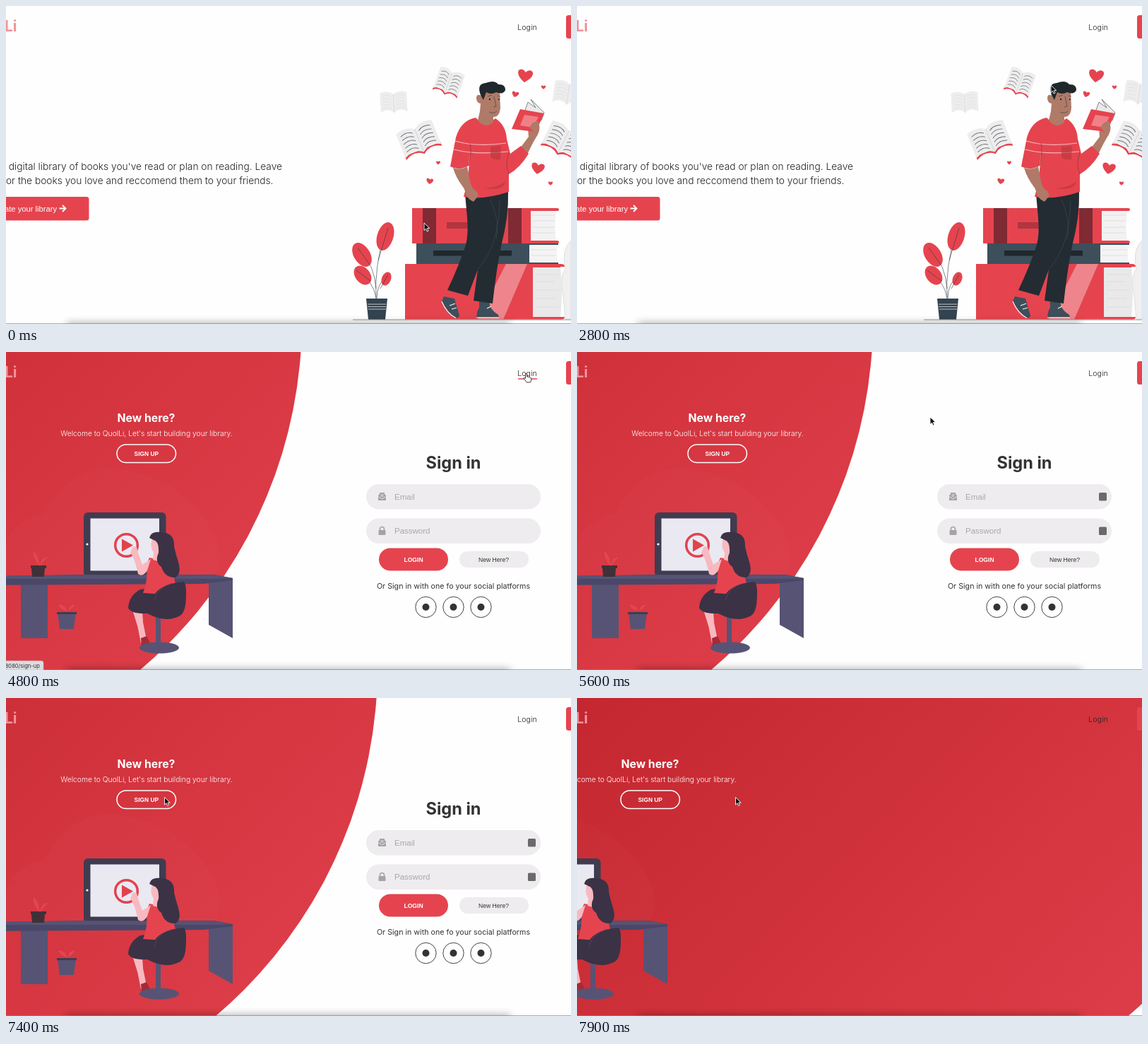
Write an HTML page that moves like this. It is 800 px wide and 450 px high and loops after 8 s.

```html
<!DOCTYPE html>
<html lang="en">
<head>
<meta charset="utf-8">
<title>Book library</title>
<style>
html, body { margin: 0; height: 100%; overflow: hidden; background: #fefefe; }
svg { display: block; width: 100vw; height: 100vh; }
text { font-family: Inter, "Open Sans", sans-serif; fill: #333; }
.light { font-weight: 300; fill: #222; }
.bold { font-weight: 700; }
.arial { font-family: "Liberation Sans", Arial, sans-serif; }
.mid { text-anchor: middle; }
.end { text-anchor: end; }
.white { fill: #fff; }
.red { fill: #e5444f; }
.hair { fill: #20282d; }
.slate { fill: #3d4f5b; }
.skin { fill: #b07a68; }
.field { fill: #eeecee; }
.icon { fill: #a5a3a6; }
.hint { fill: #a9a7aa; font-size: 11.5px; }
.ink { fill: #3b3246; }
.desk { fill: #575375; }
.pink { fill: #f8b9c0; }
.line { fill: none; stroke: #2f393f; stroke-width: .6; }
</style>
</head>
<body>
<svg viewBox="0 0 800 450">
  <defs>
    <linearGradient id="redFade" x1="0" y1="0" x2="1" y2="1">
      <stop stop-color="#b0161c"/><stop offset="1" stop-color="#e4434f"/>
    </linearGradient>
    <filter id="blur" x="-10%" y="-200%" width="120%" height="500%"><feGaussianBlur stdDeviation="6"/></filter>
    <path id="heart" d="M0 9C-6 5-11 0-10.500-5C-10-9.500-3-10 0-5C3-10 10-9.500 10.500-5C11 0 6 5 0 9Z"/>
    <g id="pages">
      <path d="M0-11Q-10-17-23-13V12Q-10 6 0 13Q10 6 23 12V-13Q10-17 0-11Z" fill="#ededee"/>
      <path d="M0-11V13" stroke="#d0d0d3" stroke-width=".6"/>
    </g>
    <g id="textLines" fill="none" stroke-width=".7">
      <path d="M-19-9Q-10-12-4-8M-19-5Q-10-8-4-4M-19-1Q-10-4-4 0M-19 3Q-10 0-4 4M-19 7Q-10 4-4 8"/>
      <path d="M19-9Q10-12 4-8M19-5Q10-8 4-4M19-1Q10-4 4 0M19 3Q10 0 4 4M19 7Q10 4 4 8"/>
    </g>
    <g id="openBook">
      <path class="red" d="M-23 10V14Q-10 8 0 15Q10 8 23 14V10Z"/>
      <use href="#pages"/><use href="#textLines" stroke="#6f7075"/>
    </g>
    <g id="paleBook"><use href="#pages"/><use href="#textLines" stroke="#dfdfe1"/></g>
  </defs>

  <g id="landing">
    <text class="light end" x="391" y="232" font-size="13.75">Create a digital library of books you've read or plan on reading. Leave</text>
    <text class="light end" x="378.500" y="252" font-size="13.75">reviews for the books you love and reccomend them to your friends.</text>
    <rect class="red" x="-60" y="270" width="177.500" height="33.500" rx="3.500"/>
    <text class="arial end white" x="72" y="290.500" font-size="11.2">Create your library</text>
    <path d="M75.500 286.500H84M80 282l4.500 4.500-4.500 4.500" fill="none" stroke="#fff" stroke-width="1.800"/>

    <use href="#openBook" transform="translate(627 108) rotate(20) scale(.8 1.250)"/>
    <use href="#openBook" transform="translate(584.500 189) rotate(-22) scale(1.180 1.450)"/>
    <use href="#paleBook" transform="translate(549 137) rotate(-3) scale(.82 1.100)"/>
    <use href="#paleBook" transform="translate(796 124) rotate(8) scale(.9 1.200)"/>
    <use href="#openBook" transform="translate(790 191) rotate(26) scale(1.180 1.450)"/>
    <g class="red">
      <use href="#heart" transform="translate(735 99) rotate(8)"/>
      <use href="#heart" transform="translate(721 125) rotate(15) scale(.46)"/>
      <use href="#heart" transform="translate(761 115) scale(.3)"/>
      <use href="#heart" transform="translate(753 230) rotate(10) scale(.88)"/>
      <use href="#heart" transform="translate(600 248) rotate(8) scale(.46)"/>
      <use href="#heart" transform="translate(612 222) scale(.28)"/>
      <use href="#heart" transform="translate(771 251) scale(.3)"/>
    </g>

    <!-- book stack -->
    <path d="M800 332Q786 345 792 372Q783 385 789 410L792 443H800Z" fill="#f0f0f1" stroke="#dedee0"/>
    <path d="M491 444H800" stroke="#777" stroke-width=".8"/>
    <path class="red" d="M565 365H786Q791 365 791 369H785V440H791Q791 443.500 786 443.500H565Z"/>
    <path d="M746 370H785Q789 405 785 440H746Z" fill="#e9e9ea"/>
    <path d="M750 380H782M750 390H776M750 402H783M750 414H778M750 426H783" stroke="#d3d3d6" stroke-width=".6"/>
    <path d="M708 365H738L704 443.500H668Z" fill="#ee858c"/>
    <path class="slate" d="M581 336H782V338H741V363H782V365H581Z"/>
    <path d="M741 338H780V363H741Z" fill="#f4f4f4"/>
    <path class="hair" d="M605 346H716V353.500H605Z"/>
    <path class="red" d="M575 286H780Q783 286 783 288T780 290H743V332H780Q783 332 783 334T780 336H575Z"/>
    <path d="M743 290H779Q776 311 779 332H743Z" fill="#f2f2f3"/>
    <path d="M745 296H777M745 304H777M745 313H777M745 321H777M743 345H779M743 353H779" stroke="#d8cdd0" stroke-width=".6"/>
    <path d="M590 286h19v50h-19zM711 286h19v50h-19z" fill="#802a33"/>
    <path d="M624 306h46v9h-46z" fill="#b2353f"/>

    <!-- potted plant -->
    <path class="line" d="M524 415Q521 370 537 318M524 400Q522 367 500 344M524 413Q520 390 500 376M525 414Q525 393 540 381"/>
    <g class="red">
      <ellipse rx="11.500" ry="20.500" transform="translate(537 326) rotate(17)"/>
      <ellipse rx="11.500" ry="18.500" transform="translate(504 352) rotate(-32)"/>
      <ellipse rx="10.500" ry="15" transform="translate(505 381) rotate(-38)"/>
      <ellipse rx="6.500" ry="10" transform="translate(538.500 386) rotate(22)"/>
    </g>
    <path class="line" d="M527 360L541 314M515 366L498 342M516 389L496 374M530 400L541 380"/>
    <path d="M510 414H540L537 443.500H513Z" fill="#33434f"/>
    <path d="M512 422H538M512 425.500H538M513 429H538" stroke="#dfe2e4" stroke-width=".8"/>

    <!-- reader -->
    <path class="slate" d="M620 411L635 414L642 438Q641 443 635 440Q625 433 617 418Z"/>
    <path class="slate" d="M670 418H684Q685 430 697 437L698 440H666Q667 430 670 427Z"/>
    <path d="M617 418Q624 435 637 441.500M666 441H698M628 424L636 421M631 429L638 427M681 428L687 425" fill="none" stroke="#f4f5f5" stroke-width="1.200"/>
    <path d="M650 266L711 263Q712 298 701 340Q694 375 689 421L662 417L668 373L654 410L625 402Q642 366 651 338Q655 322 653 300Z" fill="#232c32"/>
    <path d="M699 275Q698 340 668 373M686 274Q700 305 694 330" fill="none" stroke="#3d484f" stroke-width=".7"/>
    <path class="skin" d="M728 201L740 185Q738 171 743 167L753 163Q758 171 753 182Q747 191 738 210Z"/>
    <path class="red" d="M665 158Q644 162 637 186L629 227Q641 234 655 226L657 208Q655 245 648 270Q675 275 712 263L712 238Q728 229 740 209L729 198L714 209L709 188Q708 169 693 159Q678 172 665 158Z"/>
    <path d="M636 191Q665 200 708 194M634 203Q665 211 711 206" fill="none" stroke="#f5b5b9" stroke-width="1.200"/>
    <path d="M686 199L701 198L700 217Q692 219 686 214ZM678 258Q699 256 707 248Q705 262 678 258Z" fill="#bd3640" opacity=".65"/>
    <path d="M655 226Q660 205 657 194M712 238Q706 225 712 207" fill="none" stroke="#98303a" stroke-width=".7"/>
    <path class="skin" d="M633 229Q644 233 653 227L657 248Q659 258 666 262L669 268L662 277Q655 274 651 267Q650 260 647 256Q637 243 633 229Z"/>
    <path class="skin" d="M674 122L673 127Q666 123 666 131Q667 138 672 138L671 149L668 162Q679 175 690 164L690 157Q699 157 700 144L699 122Q686 113 674 122Z"/>
    <path class="hair" d="M672 126Q666 110 679 109Q692 104 697 111Q707 110 707 119Q704 126 694 122Q687 126 680 122L676 133Z"/>
    <path class="line" d="M691 128L694 142L690 143M682 128L688 126M696 127L700 128M684 150Q690 153 695 149"/>
    <circle class="hair" cx="685" cy="132" r="1.200"/><circle class="hair" cx="698" cy="132" r="1.100"/>
    <path d="M734 150L739 136L750 144L743 132L762 151L758 162Z" fill="#e9e9ea" stroke="#4e555a" stroke-width=".7"/>
    <path class="red" d="M728 146L762 152L750 178L716 174Z"/>
    <path d="M734 154L754 157L746 172L728 169Z" fill="#f08088"/>
    <path class="skin" d="M741 172Q745 163 754 163Q757 172 751 181Z"/>
  </g>

  <g id="login">
    <g id="form">
      <text class="bold mid" x="633.500" y="164.500" font-size="23.6">Sign in</text>
      <rect class="field" x="510" y="187" width="247" height="35.500" rx="17.750"/>
      <rect class="field" x="510" y="235.500" width="247" height="35.500" rx="17.750"/>
      <text class="arial hint" x="550" y="208.500">Email</text>
      <text class="arial hint" x="550" y="257">Password</text>
      <path class="icon" d="M527 203L529 201V199H536V201L538 203V210H527Z"/>
      <path d="M530.500 202H534.500M530.500 204H534.500M527 204.500L532.500 208L538 204.500" fill="none" stroke="#eeecee" stroke-width=".9"/>
      <rect class="icon" x="527.500" y="252" width="10" height="7" rx="1"/>
      <path d="M529.500 253V250.500a3 3 0 0 1 6 0V253" fill="none" stroke="#a5a3a6" stroke-width="1.600"/>
      <g id="fieldMarks" fill="#6b696c">
        <rect x="739" y="199" width="11" height="11.500" rx="1.500"/>
        <rect x="739" y="247.500" width="11" height="11.500" rx="1.500"/>
      </g>
      <rect class="red" x="528" y="277.500" width="98" height="32" rx="16"/>
      <text class="arial bold mid white" x="577" y="296.500" font-size="8.6">LOGIN</text>
      <rect class="field" x="642" y="282" width="98" height="23" rx="11.500"/>
      <text class="arial mid" x="690.500" y="296.500" font-size="8.6">New Here?</text>
      <text class="mid" x="633.500" y="334.500" font-size="10.7">Or Sign in with one fo your social platforms</text>
      <g fill="none" stroke="#444"><circle cx="594.500" cy="361" r="14.700"/><circle cx="633.500" cy="361" r="14.700"/><circle cx="672.500" cy="361" r="14.700"/></g>
      <g fill="#333"><circle cx="594.500" cy="361" r="5"/><circle cx="633.500" cy="361" r="5"/><circle cx="672.500" cy="361" r="5"/></g>
    </g>

    <circle id="disc" cx="-230" cy="-45" r="649" fill="url(#redFade)"/>

    <g id="content">
      <text class="bold mid white" x="198.500" y="98.500" font-size="15.8">New here?</text>
      <text class="light mid" x="199" y="119" font-size="10.3" style="fill:#fff">Welcome to QuolLi, Let's start building your library.</text>
      <rect x="157" y="131" width="83.500" height="25.500" rx="12.750" fill="none" stroke="#fff" stroke-width="1.500"/>
      <text class="arial bold mid white" x="198.800" y="147" font-size="8.4">SIGN UP</text>
    </g>

    <g id="scene">
      <path d="M0 270Q10 238 55 228Q85 165 150 164Q235 172 285 240Q315 285 295 318H0Z" fill="#fff" opacity=".014"/>
      <rect x="110" y="227" width="116.500" height="91" rx="6" fill="#403c50"/>
      <path d="M119.500 235.500h97.500v74h-97.500z" fill="#eae9f2"/>
      <circle class="white" cx="115" cy="272" r="1.600"/>
      <circle cx="170.500" cy="273.500" r="15.800" fill="none" stroke="#e0434e" stroke-width="3.500"/>
      <path d="M164 264.500L180 273.500L164 282.500Z" fill="#e0434e"/>
      <g class="desk">
        <path d="M21 328H59V391H59V405H21ZM287 327L321 321V405L287 386Z"/>
        <path d="M73 368H99L96 392H76Z"/>
      </g>
      <path d="M-60 318L100 315H295L321 320V323L280 328L-60 330Z" fill="#4b4768"/>
      <path d="M-60 317L100 315.500H295L321 320L290 321H-60Z" fill="#575375"/>
      <path d="M72 368H100V371H72Z" fill="#403c50"/>
      <path d="M35 302H57V306H55L54 318H37L36 306H35Z" fill="#403138"/>
      <path d="M46 302Q36 291 38 280Q47 287 48 300Q50 288 61 290Q54 295 50 302ZM85 367Q73 363 74 356Q85 358 87 366Q90 355 99 357Q95 364 88 367Z" fill="#e5444f" stroke="#b53540" stroke-width=".5"/>

      <!-- viewer on chair -->
      <path class="pink" d="M180 368H191L199 407L193 410ZM182 366L193 367L196 410L191 412Z"/>
      <path d="M191 405L199 402L204 412L192 417Z" fill="#a32c37"/>
      <path class="desk" d="M212 372H219V416H212Z"/>
      <ellipse class="desk" cx="217" cy="418.500" rx="28" ry="8"/>
      <path class="ink" d="M190 336Q174 345 173 362Q177 371 200 370Q229 385 247 372L255 340L225 332Z"/>
      <path class="red" d="M203 291L218 294Q236 305 240 328L222 343L194 341Q202 322 198 303Z"/>
      <path class="pink" d="M205 293Q196 299 193 301L187 284L185 276L180 275L176 284Q182 291 187 314Q194 319 200 309ZM207 264Q203 275 209 284L208 294L219 297L221 266Z"/>
      <path class="ink" d="M203 263Q205 253 220 255Q239 256 238 275Q240 285 244 297Q249 314 240 319Q225 320 220 304Q210 297 216 284Q217 268 209 266Z"/>
      <path d="M252 334Q255 364 246 371Q239 377 214 371" fill="none" stroke="#3b3246" stroke-width="4"/>
      <path class="ink" d="M211 342Q221 328 251 325Q257 328 254 352Q249 367 232 368Q213 365 210 350Z"/>
      <path d="M210 352Q213 334 235 327" fill="none" stroke="#64506a" stroke-width=".6"/>
    </g>
  </g>

  <!-- navigation and browser chrome -->
  <text class="bold end" x="15.500" y="36" font-size="21" style="fill:#f0939a">QuolLi</text>
  <text class="light mid" x="738" y="33.500" font-size="10.6">Login</text>
  <path id="underline" d="M725 38H752" stroke="#dc4458" stroke-width="1.500"/>
  <rect class="red" x="793" y="13" width="60" height="33" rx="3.500"/>
  <rect x="86" y="449" width="628" height="14" fill="#000" opacity=".36" filter="url(#blur)"/>
  <path d="M0 449.500H800" stroke="#888" stroke-opacity=".7"/>
  <g id="status">
    <path d="M0 437H50Q53 437 53 440V450H0Z" fill="#dcdce0" stroke="#bbb" stroke-width=".6"/>
    <text class="end" x="48" y="446.500" font-size="7.600">localhost:8080/sign-up</text>
  </g>
  <g id="cursor">
    <path id="arrow" d="M0 0V10.500L2.500 8.300L4.200 12L6 11.200L4.400 7.600H7.800Z" fill="#111" stroke="#fff" stroke-width=".9"/>
    <path id="hand" d="M-1.100 1.200a1.100 1.100 0 0 1 2.200 0v3.300q2-.6 2.400.5 2-.3 2.100.8 1.900 0 1.700 1.600l-.5 3-1 1.900h-5.200l-1-1.600-3-3.500q-.4-1.600 1-1.400l1.300 1.100z" fill="#fff" stroke="#222" stroke-width=".9"/>
  </g>
</svg>
<script>
const LOOP = 8000, STEP = 100, OPEN_LOGIN = 4400, CLICK = 7033;
const el = id => document.getElementById(id);
const show = (id, on) => { el(id).style.display = on ? '' : 'none'; };
const moveTo = (id, x, y = 0) => el(id).setAttribute('transform', `translate(${x} ${y})`);

// time, x, y of the pointer's hot spot
const pointerPath = [
  [0, 592, 307], [2200, 592, 307], [2600, 652, 142], [2800, 671, 112],
  [3600, 716, 50], [3800, 716, 50], [3900, 737, 31], [5000, 736.5, 30.5],
  [5600, 500, 92], [5800, 500, 92], [6400, 224.5, 140.5], [LOOP, 224.5, 140.5]
];

function pointerAt(t) {
  const i = pointerPath.findIndex(key => key[0] > t);
  const [t0, x0, y0] = pointerPath[i - 1], [t1, x1, y1] = pointerPath[i];
  const k = (t - t0) / (t1 - t0);
  return [x0 + (x1 - x0) * k, y0 + (y1 - y0) * k];
}

// CSS ease-in-out: cubic-bezier(.42, 0, .58, 1)
function easeInOut(x) {
  if (x <= 0) return 0;
  if (x >= 1) return 1;
  let low = 0, high = 1, s;
  for (let i = 0; i < 24; i++) {
    s = (low + high) / 2;
    const bx = 1.26 * s * (1 - s) ** 2 + 1.74 * s * s * (1 - s) + s ** 3;
    if (bx < x) low = s; else high = s;
  }
  return s * s * (3 - 2 * s);
}

function draw(t) {
  const onLogin = t >= OPEN_LOGIN;
  const slide = (delay, duration, distance) => distance * easeInOut((t - CLICK - delay) / duration);
  const [x, y] = pointerAt(t);
  const overLink = x > 724 && x < 752 && y > 20 && y < 40;
  const overSignUp = onLogin && t < CLICK && x > 157 && x < 240 && y > 131 && y < 157;

  show('landing', !onLogin);
  show('login', onLogin);
  show('fieldMarks', t >= 5000);
  show('underline', overLink);
  show('status', overLink);
  show('hand', overLink || overSignUp);
  show('arrow', !overLink && !overSignUp);
  moveTo('cursor', x, y);
  moveTo('disc', slide(0, 1800, 1261));
  moveTo('content', slide(600, 900, -519));
  moveTo('scene', slide(400, 1100, -519));
}

function tick() {
  draw(Math.floor(performance.now() % LOOP / STEP) * STEP);
  requestAnimationFrame(tick);
}
tick();
</script>
</body>
</html>
```
